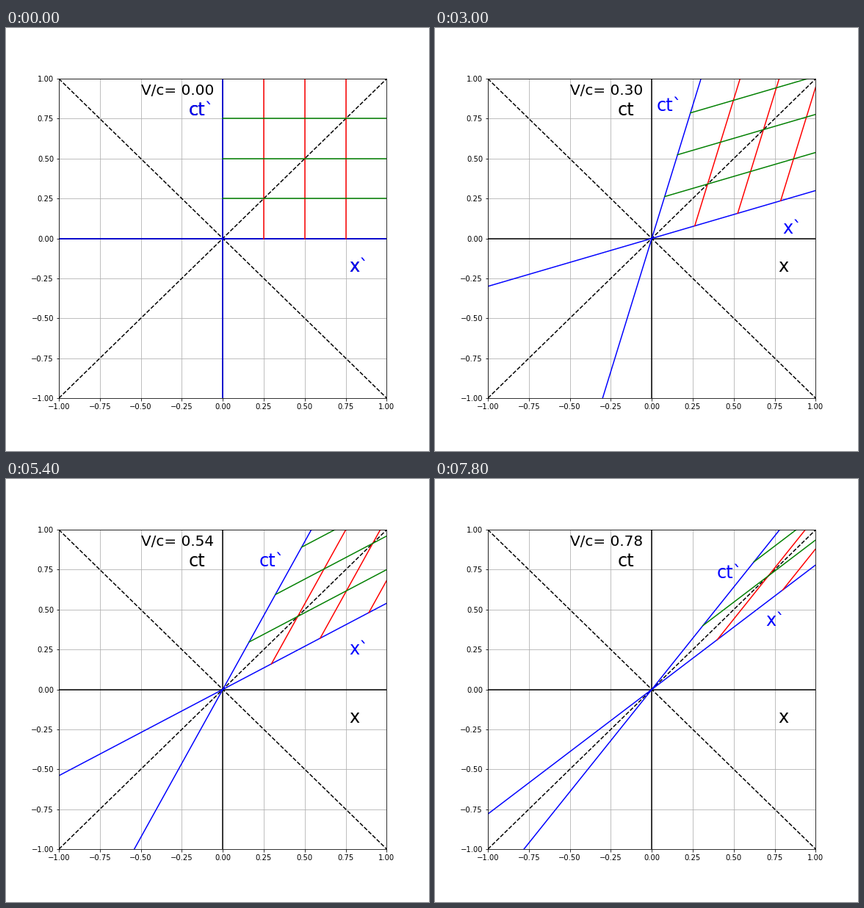
Write a matplotlib script that moves like this. It is 576 px wide and 576 px high and loops after 8000 ms.

```python
import numpy as np
import matplotlib.pyplot as plt
from matplotlib.animation import FuncAnimation

FRAMES, INTERVAL = 40, 200
V_STEP = 0.02
MARKS = (0.25, 0.5, 0.75)
LABEL_R, LABEL_TILT = 0.8, np.pi / 12

fig = plt.figure(figsize=(8, 8), dpi=72)
fig.subplots_adjust(left=0.125, right=0.9, bottom=0.125, top=0.88)
ax = fig.add_subplot()
ax.set(xlim=(-1, 1), ylim=(-1, 1))
ax.grid(True)


def line(xs, ys, style):
    return ax.plot(xs, ys, style, lw=1.5)[0]


def x_label_pos(turn):
    a = turn - LABEL_TILT
    return LABEL_R * np.cos(a), LABEL_R * np.sin(a)


def label(pos, text, color):
    return ax.text(*pos, text, color=color, fontsize=24)


# Rest frame and light cone
line([-1, 1], [0, 0], "k-")
line([0, 0], [-1, 1], "k-")
line([-1, 1], [-1, 1], "k--")
line([-1, 1], [1, -1], "k--")
home = x_label_pos(0)
label(home, "x", "k")
label(home[::-1], "ct", "k")

# Moving frame
x_axis = line([], [], "b-")
ct_axis = line([], [], "b-")
reds = [line([], [], "r-") for _ in MARKS]
greens = [line([], [], "g-") for _ in MARKS]
x_text = label(home, "x`", "b")
ct_text = label(home[::-1], "ct`", "b")
speed = ax.text(-0.5, 0.9, "", fontsize=20)


def update(i):
    v = V_STEP * i
    gamma = 1 / np.sqrt(1 - v * v)
    span = np.array([-1, 1])
    x_axis.set_data(span, v * span)
    ct_axis.set_data(v * span, span)
    for mark, red, green in zip(MARKS, reds, greens):
        # Each line starts on a moving axis and runs parallel to the other
        start = gamma * mark
        along = np.array([start, start + v])
        across = np.array([v * start, v * start + 1])
        red.set_data(along, across)
        green.set_data(across, along)
    x, y = x_label_pos(v)
    x_text.set_position((x, y))
    # The time axis turns the other way, mirrored in the light line
    ct_text.set_position((y, x))
    speed.set_text(f"V/c= {v:.2f}")
    return [x_axis, ct_axis, *reds, *greens, x_text, ct_text, speed]


anim = FuncAnimation(fig, update, frames=FRAMES, interval=INTERVAL,
                     repeat=True, repeat_delay=0)
plt.show()
```
